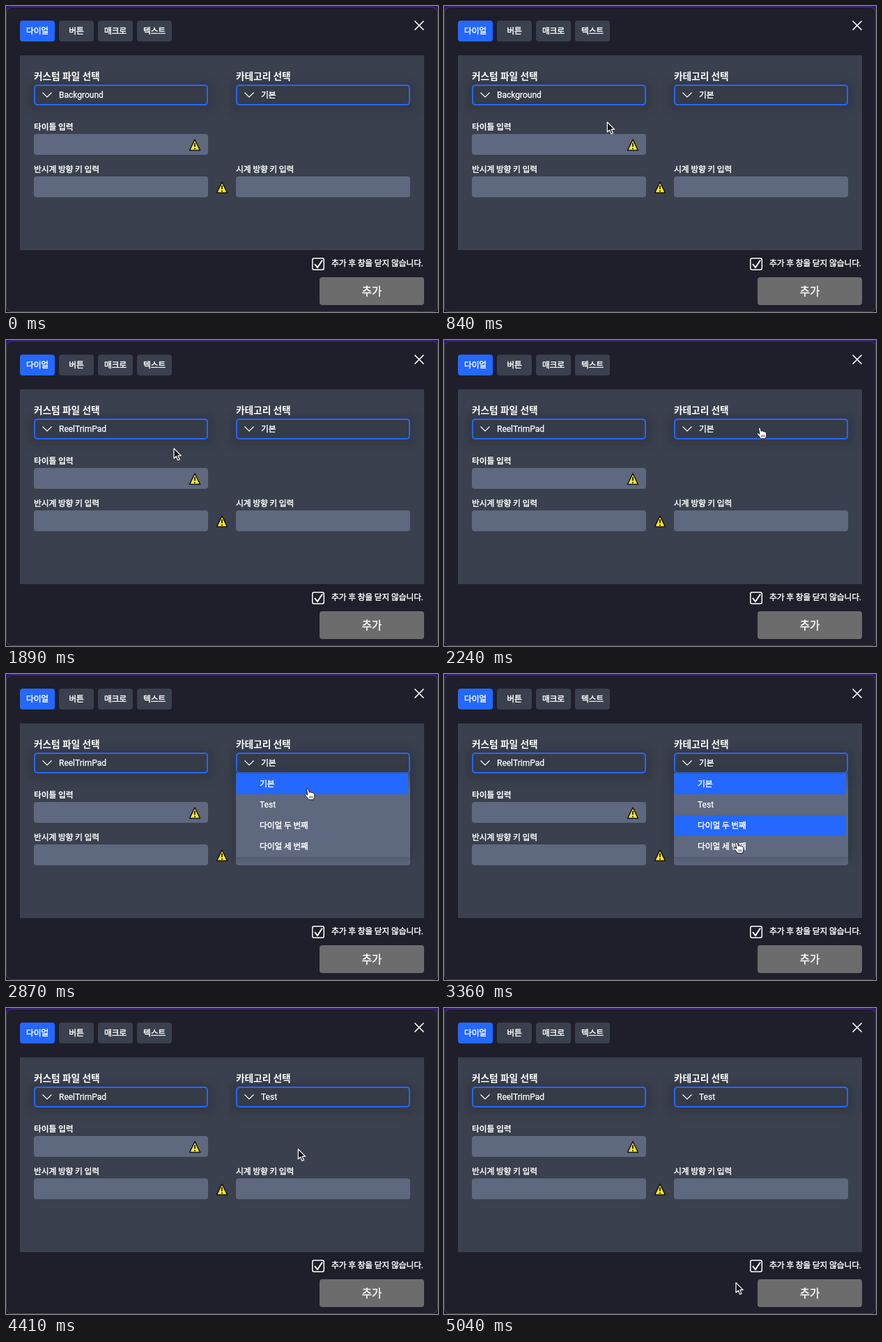
Animation of 620x440 px, one loop 5.11 s. Source, as an HTML page:

```html
<!DOCTYPE html>
<html lang="ko">
<head>
<meta charset="utf-8">
<style>
html, body { margin: 0; width: 100%; height: 100%; overflow: hidden; background: #1f1f2b; }
svg { display: block; width: 620px; height: 440px; }
text { font: 400 12px Roboto, "Noto Sans CJK KR", "Noto Sans CJK", sans-serif; fill: #fff; stroke: #fff; stroke-width: .25px; }
.ko { font-size: 11.8px; letter-spacing: -.15px; stroke-width: .4px; }
.head { font-size: 13.7px; font-weight: 700; letter-spacing: -.05px; stroke: none; }
.bold { font-size: 11.8px; font-weight: 700; letter-spacing: -.1px; stroke: none; }
.line { fill: none; stroke: #fff; }
</style>
</head>
<body>
<svg id="stage" viewBox="0 0 620 440" xmlns="http://www.w3.org/2000/svg">
  <defs>
    <filter id="blur" x="-20%" y="-80%" width="140%" height="260%"><feGaussianBlur stdDeviation="6"/></filter>
    <linearGradient id="shade" x1="0" y1="0" x2="0" y2="1">
      <stop offset="0" stop-color="#20242e" stop-opacity=".35"/>
      <stop offset="1" stop-color="#20242e" stop-opacity="0"/>
    </linearGradient>
    <linearGradient id="desk" x1="0" y1="0" x2="0" y2="1">
      <stop offset="0" stop-color="#32127a"/>
      <stop offset=".1" stop-color="#1c1430"/>
    </linearGradient>
    <g id="warn">
      <path d="M0-8 7.500 7.500H-7.500Z" fill="#ffe81f" stroke="#15151c" stroke-width="1.600" stroke-linejoin="round"/>
      <path d="M0-3V2.600M0 4.200V6" stroke="#15151c" stroke-width="1.700"/>
    </g>
  </defs>
  <rect width="620" height="440" fill="url(#desk)"/>
  <rect x=".5" y="1.5" width="619" height="438" rx="8" fill="#1f1f2b" stroke="#41414e"/>
  <g id="tabs"></g>
  <path class="line" d="M586.5 21.5 599.5 34.5M599.5 21.5 586.5 34.5" stroke-width="1.6"/>
  <rect x="20" y="71" width="580" height="280" fill="#3a404d"/>
  <g id="form"></g>
  <rect class="line" x="439.8" y="362.8" width="16.5" height="16.5" rx="2.5" stroke-width="1.5"/>
  <path class="line" d="M443 371 447 376 454 365.5" stroke-width="2"/>
  <text class="ko" x="467" y="374.4">추가 후 창을 닫지 않습니다.</text>
  <rect x="450" y="390" width="150" height="40" rx="4" fill="#6c6c6c"/>
  <text x="525" y="415.8" text-anchor="middle" style="font-size:15.5px;stroke-width:.4px">추가</text>
  <g id="popups"></g>
  <g id="hand" stroke="#14141a" stroke-width="1" stroke-linejoin="round">
    <path fill="#fff" d="M-1.5 1C-1.3-.4.9-.4 1.3 1L2.3 5.3C3 4.2 4.8 4.4 5 5.7 5.9 4.9 7.3 5.3 7.5 6.5 8.6 6 9.7 6.8 9.7 8V11.5C9.7 13 8.7 13.8 8.5 15.8H1.3C.8 13.6-2.2 11.5-3.7 9.2-4.3 8-2.8 7.2-1.7 8.1L-.2 9.2Z"/>
    <path fill="none" stroke-width=".8" d="M2.8 10.5V13.5M4.8 10.5V13.5M6.8 10.5V13.5"/>
  </g>
  <path id="arrow" d="M0 0V14.2L3.3 11.2 5.7 16.8 8.2 15.7 5.8 10.3H10.3Z" fill="#15151c" stroke="#fff" stroke-width="1.2" stroke-linejoin="round"/>
</svg>
<script>
const LOOP = 5110, STEP = 70, ROW = 30, TOP = 143;
const BLUE = '#2468ff', SLATE = '#5e687e';
const $ = id => document.getElementById(id);

function add(parent, tag, attrs, content) {
  const el = document.createElementNS('http://www.w3.org/2000/svg', tag);
  for (const k in attrs) el.setAttribute(k, attrs[k]);
  if (content) el.textContent = content;
  parent.appendChild(el);
  return el;
}
const box = (p, x, y, width, height, fill, rx = 0, more = {}) =>
  add(p, 'rect', { x, y, width, height, fill, rx, ...more });
const kind = s => /[가-힣]/.test(s) ? 'ko' : '';
const label = (p, x, y, s, cls = kind(s)) => add(p, 'text', { x, y, class: cls }, s);
const show = (el, on) => el.setAttribute('visibility', on ? 'visible' : 'hidden');

function setText(el, s) {
  el.textContent = s;
  el.setAttribute('class', kind(s));
}

['다이얼', '버튼', '매크로', '텍스트'].forEach((s, i) => {
  const x = 20 + i * 56;
  box($('tabs'), x, 21, 50, 30, i ? '#3a404d' : BLUE, 4);
  add($('tabs'), 'text', { x: x + 25, y: 40.4, 'text-anchor': 'middle', class: 'ko' }, s);
});

const form = $('form');
function combo(x, title) {
  box(form, x - 8, 108, 266, 44, '#20242e', 8, { opacity: .25, filter: 'url(#blur)' });
  label(form, x, 106, title, 'head');
  box(form, x + 1, 114, 248, 28, '#353b47', 4, { stroke: BLUE, 'stroke-width': 2 });
  add(form, 'path', { class: 'line', d: `M${x + 12.5} 124.5l6.500 6.500l6.500-6.500`, 'stroke-width': 1.2 });
  return label(form, x + 36, 132.3, '');
}
function field(x, y, title, cls) {
  label(form, x, y - 5.6, title, cls);
  box(form, x, y, 250, 30, SLATE, 4);
}
const fileText = combo(40, '커스텀 파일 선택');
const groupText = combo(330, '카테고리 선택');
field(40, 184, '타이틀 입력', 'bold');
field(40, 245, '반시계 방향 키 입력');
field(330, 245, '시계 방향 키 입력');
[[271, 200], [310, 261]].forEach(([x, y]) =>
  add(form, 'use', { href: '#warn', transform: `translate(${x} ${y})` }));

function popup(x, items, chosen, open, close) {
  const g = add($('popups'), 'g', {}), h = items.length * ROW;
  box(g, x - 6, TOP, 262, h + 4, '#20242e', 6, { opacity: .25, filter: 'url(#blur)' });
  box(g, x, TOP - 1, 250, h + 1, SLATE);
  box(g, x, TOP - 1, 250, 24, 'url(#shade)');
  const rows = items.map((s, i) => {
    const r = box(g, x, TOP + i * ROW, 247, ROW, BLUE);
    label(g, x + 34, TOP + i * ROW + 19.4, s);
    return r;
  });
  return { g, x, h, rows, chosen, open, close };
}
const files = ['ReelTrimPad', 'Grid10', 'Background'];
const groups = ['기본', 'Test', '다이얼 두 번째', '다이얼 세 번째'];
const lists = [popup(40, files, 2, 1330, 1890), popup(330, groups, 0, 2520, 4270)];

// time, x, y of the pointer tip
const path = [
  [210, 330, 440], [490, 228, 188], [700, 228, 188], [1120, 247, 125], [1400, 247, 124],
  [1680, 240, 155], [1890, 241, 156], [2240, 453, 126], [2520, 447, 127], [2870, 433, 165],
  [3010, 430, 170], [3360, 420, 242], [3430, 420, 250], [3570, 420, 254], [3640, 420, 250],
  [3920, 419, 190], [3990, 419, 187], [4340, 419, 187], [4550, 420, 235], [4900, 419, 385],
  [5040, 419, 395]
];
function pointer(t) {
  const i = path.findIndex(p => p[0] > t);
  if (i < 1) return path[i ? path.length - 1 : 0].slice(1);
  const [t0, x0, y0] = path[i - 1], [t1, x1, y1] = path[i];
  const u = (t - t0) / (t1 - t0);
  return [x0 + (x1 - x0) * u, y0 + (y1 - y0) * u];
}

function draw(ms) {
  const t = Math.floor((ms % LOOP) / STEP) * STEP;
  const [x, y] = pointer(t), [hx, hy] = pointer(t - STEP);
  setText(fileText, files[t < lists[0].close ? 2 : 0]);
  setText(groupText, groups[t < lists[1].close ? 0 : 1]);
  let hand = y >= 113 && y < TOP && (x >= 40 && x < 290 || x >= 330 && x < 580);
  for (const l of lists) {
    const on = t >= l.open && t < l.close;
    const inside = hx >= l.x && hx < l.x + 250;
    const hover = inside ? Math.floor((hy - TOP) / ROW) : -1;
    l.g.setAttribute('display', on ? 'inline' : 'none');
    l.rows.forEach((r, i) => show(r, i === l.chosen || i === hover));
    if (on && x >= l.x && x < l.x + 250 && y >= 113 && y < TOP + l.h) hand = true;
  }
  const seen = t >= path[0][0];
  for (const id of ['hand', 'arrow']) {
    show($(id), seen && hand === (id === 'hand'));
    $(id).setAttribute('transform', `translate(${x} ${y})`);
  }
}

const start = performance.now();
function tick() {
  draw(performance.now() - start);
  requestAnimationFrame(tick);
}
draw(0);
requestAnimationFrame(tick);
</script>
</body>
</html>
```
